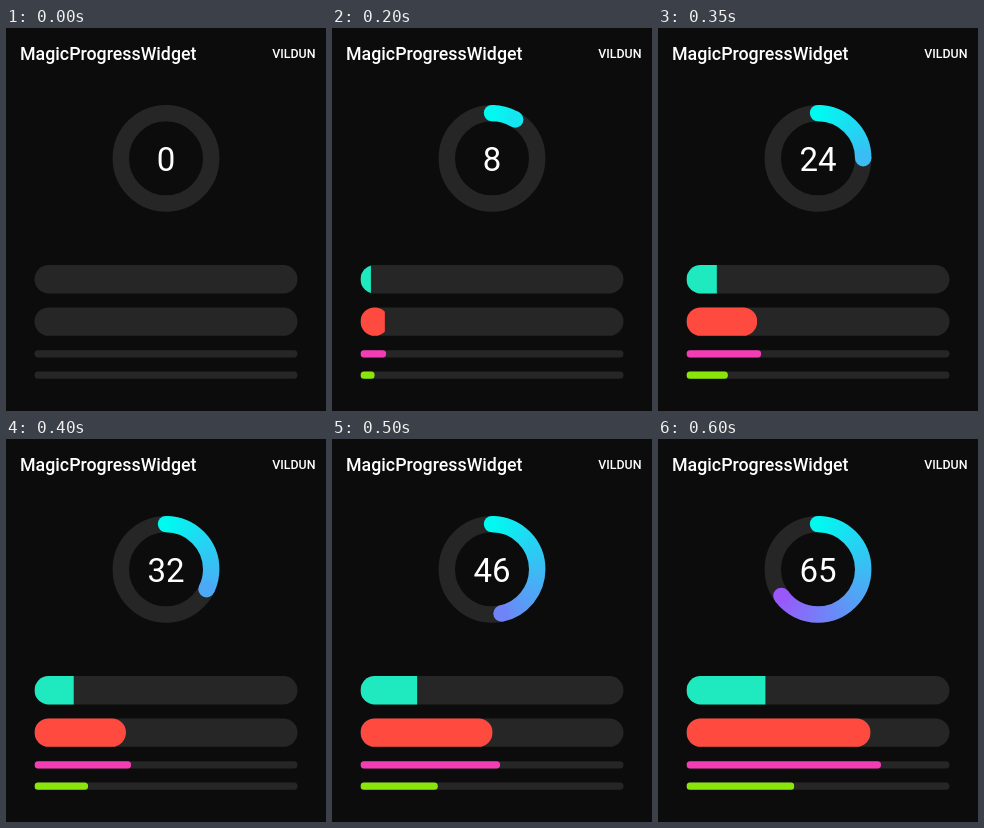
Write an HTML page with a canvas that moves like this. It is 320x383 px and loops after 2.6 s.

```html
<!DOCTYPE html>
<html lang="en">
<head>
<meta charset="utf-8">
<title>MagicProgressWidget</title>
<style>
  html, body { margin: 0; width: 100%; height: 100%; overflow: hidden; background: #0c0c0c; }
  canvas, svg { position: absolute; left: 0; top: 0; width: 320px; height: 383px; }
  text { font-family: Roboto, sans-serif; fill: #fff; }
  .bar { font-weight: 500; }
</style>
</head>
<body>
<canvas id="stage"></canvas>
<svg viewBox="0 0 320 383">
  <text class="bar" x="14" y="32.4" font-size="17.8">MagicProgressWidget</text>
  <text class="bar" x="309.5" y="30.4" font-size="12.4" text-anchor="end">VILDUN</text>
  <text id="count" x="160" y="143" font-size="33" text-anchor="middle">0</text>
</svg>
<script>
const LOOP = 2600, RISE = 600, STEP = 50;
const TRACK = '#262627';
const LEFT = 28.5, WIDTH = 263;
const RING = { x: 160, y: 130.3, r: 45.2, w: 16.4, share: 0.65 };
const BARS = [
  { y: 237, h: 28.4, share: 0.30, color: '#1fe9bf', flat: true },
  { y: 279.4, h: 28.4, share: 0.70, color: '#ff4a3f' },
  { y: 322.2, h: 7.2, share: 0.74, color: '#f23db4' },
  { y: 343.6, h: 7.2, share: 0.41, color: '#8ae60a' }
];
// Sampled phase of the ease-in, in degrees, every 100 ms
const PHASE = [0, 15.1, 29.8, 44.2, 59.8, 73.6, 90];

const canvas = document.getElementById('stage');
const count = document.getElementById('count');
const ctx = canvas.getContext('2d');
const dpr = window.devicePixelRatio || 1;
canvas.width = 320 * dpr;
canvas.height = 383 * dpr;
ctx.scale(dpr, dpr);

const sweep = ctx.createConicGradient(-Math.PI / 2, RING.x, RING.y);
sweep.addColorStop(0, sweepColor(0));
sweep.addColorStop(1, sweepColor(1));

function sweepColor(k) {
  return `rgb(${237 * k}, ${250 * (1 - k)}, ${240 + 15 * k})`;
}

function progress(ms) {
  const t = Math.min(Math.floor(ms / STEP) * STEP, RISE) / 100;
  const i = Math.min(Math.floor(t), PHASE.length - 2);
  const deg = PHASE[i] + (PHASE[i + 1] - PHASE[i]) * (t - i);
  return 1 - Math.cos(deg * Math.PI / 180);
}

function pill(y, w, h, color) {
  ctx.fillStyle = color;
  ctx.beginPath();
  ctx.roundRect(LEFT, y, w, h, h / 2);
  ctx.fill();
}

function drawBar({ y, h, share, color, flat }, p) {
  pill(y, WIDTH, h, TRACK);
  const w = WIDTH * share * p;
  if (w <= 0) return;
  ctx.save();
  ctx.beginPath();
  ctx.rect(LEFT, y - 1, w, h + 2);
  ctx.clip();
  pill(y, flat ? WIDTH : Math.max(w, h), h, color);
  ctx.restore();
}

function arc(from, to, style) {
  ctx.strokeStyle = style;
  ctx.beginPath();
  ctx.arc(RING.x, RING.y, RING.r, from, to);
  ctx.stroke();
}

function cap(angle, color) {
  ctx.fillStyle = color;
  ctx.beginPath();
  ctx.arc(RING.x + RING.r * Math.cos(angle), RING.y + RING.r * Math.sin(angle),
    RING.w / 2, 0, Math.PI * 2);
  ctx.fill();
}

function drawRing(p) {
  ctx.lineWidth = RING.w;
  arc(0, Math.PI * 2, TRACK);
  if (p <= 0) return;
  const share = RING.share * p;
  const start = -Math.PI / 2, end = start + share * Math.PI * 2;
  cap(start, sweepColor(0));
  arc(start, end, sweep);
  cap(end, sweepColor(share));
}

function draw() {
  const p = progress(performance.now() % LOOP);
  ctx.fillStyle = '#0c0c0c';
  ctx.fillRect(0, 0, 320, 383);
  drawRing(p);
  BARS.forEach(bar => drawBar(bar, p));
  count.textContent = Math.floor(RING.share * p * 100 + 1e-6);
  requestAnimationFrame(draw);
}
draw();
</script>
</body>
</html>
```
